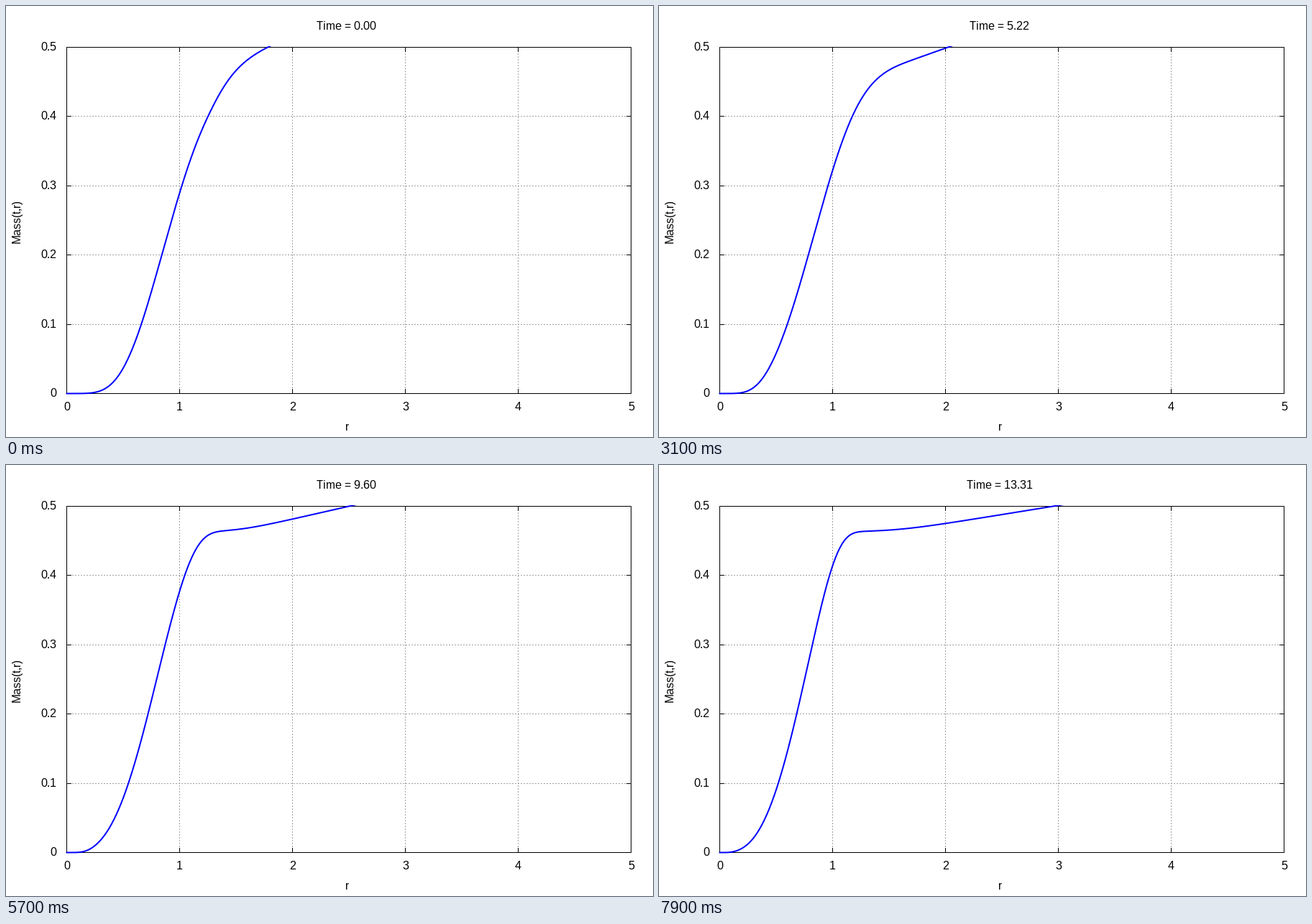
Animation of 900x600 px, one loop 8 s. Source, as a matplotlib script:

```python
import numpy as np
import matplotlib
import matplotlib.pyplot as plt
from matplotlib.animation import FuncAnimation

matplotlib.rcParams.update({
    "font.family": "Liberation Sans",
    "text.hinting": "native",
    "text.hinting_factor": 1,
})

W, H, DPI = 900, 600, 100
FRAMES, INTERVAL = 80, 100
DT = 0.16846                      # simulated time per frame
LEFT, RIGHT, TOP, BOTTOM = 84.5, 869.5, 57.5, 539.5
R_MAX, M_MAX = 5, 0.5
CORE = 0.463                      # mass that gathers in the centre
PX = 72 / DPI                     # one pixel in points
TICK = 6


def to_x(r):
    return LEFT + (RIGHT - LEFT) * r / R_MAX


def to_y(m):
    return BOTTOM - (BOTTOM - TOP) * m / M_MAX


def mass(r, tau):
    """Enclosed mass: a contracting core plus a shell drifting outwards."""
    s = (1 - np.cos(2.4 * tau)) / (1 - np.cos(2.4))
    density = 0.99 + 0.745 * s
    edge = 0.005 + 0.29 * s ** 2              # sharpness of the core's rim
    hollow = 1 - np.exp(-4.4 * np.exp(3.5 * s) * r ** 2)
    core = CORE * (1 - np.exp(-density * r ** 3 * (1 + edge * r ** 6) * hollow))

    slope = 0.074 * np.exp(-1.03 * s)
    soft = 0.04 + 0.14 * s
    reach = 1.77 + 1.75 * tau ** 2 / (1 + 0.48 * tau ** 2)   # radius where M = M_MAX
    start = reach - (M_MAX - CORE) / slope
    shell = slope * soft * np.logaddexp(0, (r - start) / soft)
    return core + shell


fig = plt.figure(figsize=(W / DPI, H / DPI), dpi=DPI, facecolor="white")
ax = fig.add_axes([0, 0, 1, 1])
ax.set(xlim=(0, W), ylim=(H, 0))
ax.axis("off")


def line(xs, ys, color="black", zorder=2, **kw):
    ax.plot(xs, ys, color=color, lw=PX, snap=False, zorder=zorder,
            solid_capstyle="projecting", **kw)


def label(x, y, s, ha="center", **kw):
    return ax.text(x, y, s, ha=ha, va="baseline", fontsize=16 * PX, **kw)


dots = dict(color="#a0a0a0", linestyle=(0, (2, 2)), dash_capstyle="butt", zorder=1)
for k in range(6):
    x = to_x(k)
    y = np.floor(to_y(k / 10)) + 0.5
    if 0 < k < 5:
        line([x, x], [BOTTOM + 0.5, TOP - 0.5], **dots)
        line([LEFT - 0.5, RIGHT + 0.5], [y, y], **dots)
    for a, d in ((TOP, TICK), (BOTTOM, -TICK)):
        line([x, x], [a, a + d])
    for a, d in ((LEFT, TICK), (RIGHT, -TICK)):
        line([a, a + d], [y, y])
    label(x, 563, str(k))
    label(70.5, y + 4.5, f"{k / 10:g}", ha="right")

line([LEFT, RIGHT, RIGHT, LEFT, LEFT], [TOP, TOP, BOTTOM, BOTTOM, TOP])
label(474.5, 591, "r")
label(19.5, 299, "Mass(t,r)", rotation=90, rotation_mode="anchor")
title = label(474, 33, "")

radius = np.linspace(0, 3.3, 600)
curve, = ax.plot([], [], color="#0000ff", lw=2 * PX, snap=False, zorder=3)
curve.set_clip_path(plt.Rectangle((LEFT - 1.5, TOP - 1.5), RIGHT - LEFT + 3,
                                  BOTTOM - TOP + 3, transform=ax.transData))


def update(step):
    curve.set_data(to_x(radius), to_y(mass(radius, step / (FRAMES - 1))))
    title.set_text(f"Time = {step * DT:.2f}")
    return curve, title


anim = FuncAnimation(fig, update, frames=FRAMES, interval=INTERVAL,
                     repeat=True, repeat_delay=0)
plt.show()
```
